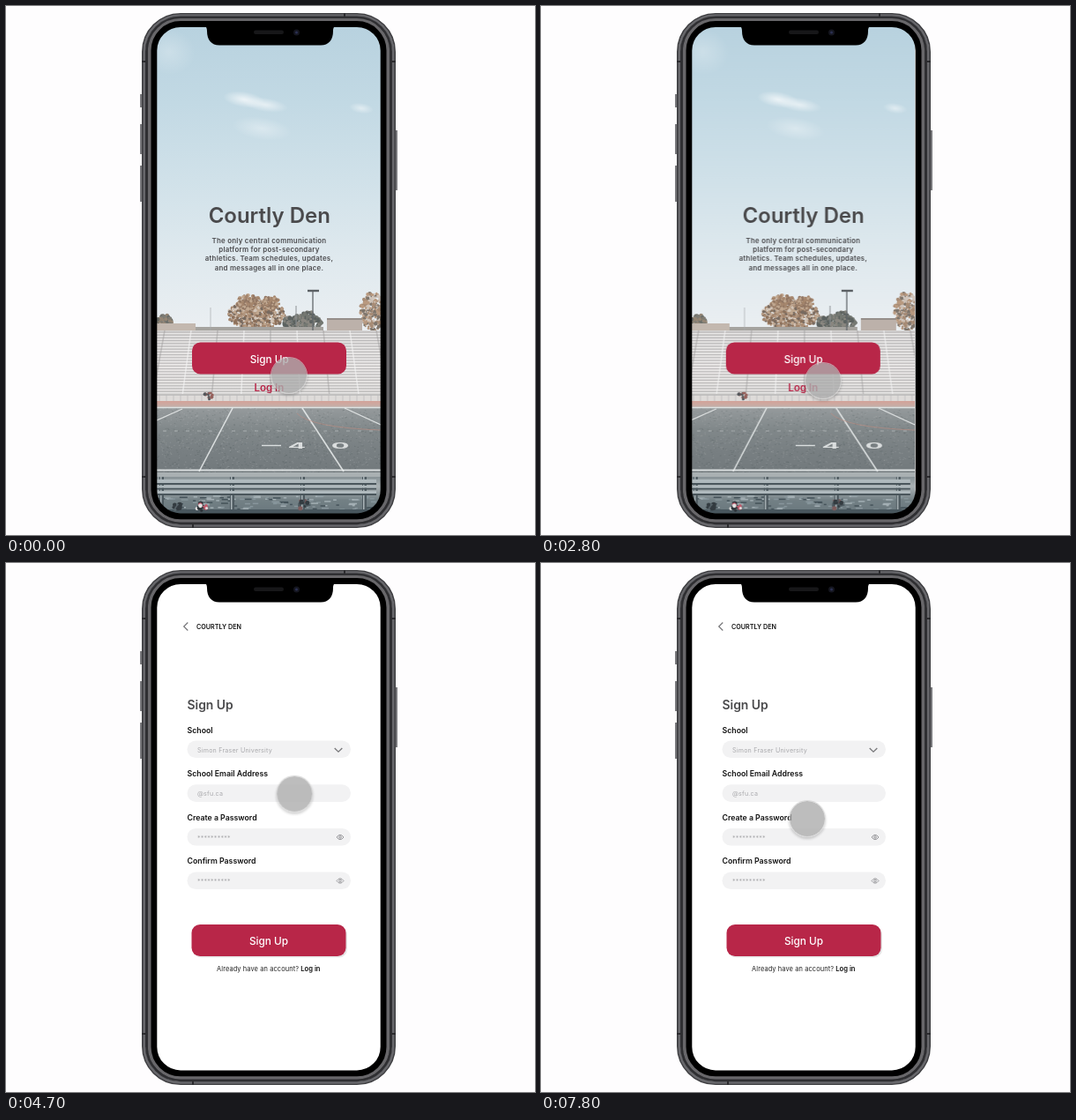
An HTML page with a canvas that plays this animation: 600x600 px, repeating every 8 s.

```html
<!DOCTYPE html>
<html lang="en">
<head>
<meta charset="utf-8">
<title>Sign up flow</title>
<style>
  html, body { margin: 0; width: 100%; height: 100%; overflow: hidden; background: #fefdfe; }
  svg, canvas { position: absolute; left: 0; top: 0; display: block; }
  text { font-family: Inter, sans-serif; white-space: pre; }
  #stage { position: absolute; left: 0; top: 0; width: 600px; height: 600px; overflow: hidden; }
  #screen { position: absolute; left: 171px; top: 23px; width: 254px; height: 553px;
    border-radius: 27px; overflow: hidden; background: #fff; }
  .page { position: absolute; inset: 0; }
  #landing { animation: push-out 8s infinite; }
  #signup { animation: push-in 8s infinite; }
  #menu { animation: menu 8s infinite; }
  #cursor { position: absolute; left: -21px; top: -21px; width: 40px; height: 40px;
    border: 1px solid rgba(205,205,205,.7); border-radius: 50%; background: rgba(173,173,173,.8);
    background-clip: padding-box; box-shadow: 0 2px 3px rgba(0,0,0,.18); animation: cursor 8s infinite; }

  .mid { text-anchor: middle; }
  .b { font-weight: 600; }
  .label { font-size: 8.75px; font-weight: 600; fill: #111; }
  .hint { font-size: 7.1px; letter-spacing: .22px; fill: #a9a9ac; }
  .item { font-size: 7.1px; letter-spacing: .2px; fill: #666; }
  .btn { font-size: 11.8px; font-weight: 500; fill: #fff; text-anchor: middle; }

  @keyframes push-out {
    0%, 34.7% { transform: none; animation-timing-function: ease-in-out; }
    41%, 100% { transform: translateX(-254px); }
  }
  @keyframes push-in {
    0%, 34.7% { transform: translateX(254px); animation-timing-function: ease-in-out; }
    41%, 100% { transform: none; }
  }
  @keyframes menu {
    0%, 62.75% { opacity: 0; }
    65.5%, 90% { opacity: 1; }
    92.5%, 100% { opacity: 0; }
  }
  @keyframes cursor {
    0% { transform: translate(321px, 419px); animation-timing-function: ease-in-out; }
    18%, 50.6% { transform: translate(320px, 425px); animation-timing-function: ease-in; }
    55.5% { transform: translate(325px, 335px); animation-timing-function: ease-out; }
    61.25% { transform: translate(328px, 238px); animation-timing-function: ease-in-out; }
    64% { transform: translate(326px, 233px); animation-timing-function: ease-in-out; }
    67.5%, 74% { transform: translate(323px, 245px); animation-timing-function: ease-in; }
    78% { transform: translate(327px, 300px); animation-timing-function: linear; }
    80.5% { transform: translate(311px, 385px); animation-timing-function: ease-out; }
    82% { transform: translate(298px, 409px); animation-timing-function: ease-in; }
    83.3% { transform: translate(291px, 388px); animation-timing-function: linear; }
    85% { transform: translate(298px, 320px); animation-timing-function: ease-out; }
    88.5%, 90.5% { transform: translate(300px, 242px); animation-timing-function: ease-in-out; }
    97%, 100% { transform: translate(302px, 290px); }
  }
</style>
</head>
<body>
<div id="stage">
  <div id="screen">
    <div class="page" id="landing">
      <canvas id="photo" width="254" height="553"></canvas>
      <svg width="254" height="553" viewBox="171 23 254 553">
        <text class="mid b" x="298.8" y="246" font-size="24" fill="#4a4a4c">Courtly Den</text>
        <g class="mid b" font-size="7.9" letter-spacing=".24" fill="#4c4c4f">
          <text x="298.5" y="268.8">The only central communication</text>
          <text x="298.5" y="279">platform for post-secondary</text>
          <text x="298.5" y="289.2">athletics. Team schedules, updates,</text>
          <text x="298.5" y="299.5">and messages all in one place.</text>
        </g>
        <rect x="211" y="381.5" width="175" height="36" rx="9.5" fill="#b82648"/>
        <text class="btn" x="298.8" y="404.6">Sign Up</text>
        <text class="mid b" x="298.3" y="436.8" font-size="11.5" fill="#b82648">Log In</text>
      </svg>
    </div>
    <div class="page" id="signup">
      <svg width="254" height="553" viewBox="171 23 254 553">
        <defs>
          <linearGradient id="edge">
            <stop offset="0" stop-color="#cf2a55"/><stop offset=".8" stop-color="#b82648"/>
            <stop offset="1" stop-color="#4b4f5c"/>
          </linearGradient>
          <g id="eye" fill="none" stroke="#858588" stroke-width=".8">
            <path d="M-4 0Q0-5.4 4 0Q0 5.4-4 0z"/><circle r="1.3"/>
          </g>
        </defs>
        <path d="M171 23h254v553h-254z" fill="#fff"/>
        <path d="M206.3 67.5l-4.6 4.5 4.6 4.5" fill="none" stroke="#77777a" stroke-width="1.2"/>
        <text class="b" x="216" y="74.7" font-size="7.2" fill="#111">COURTLY DEN</text>
        <text class="b" x="205.5" y="165.8" font-size="13.9" fill="#4a4a4c">Sign Up</text>
        <g id="fields" fill="#f2f2f3"></g>
        <g class="label">
          <text x="205.5" y="192.8">School</text>
          <text x="205.5" y="242.3">School Email Address</text>
          <text x="205.5" y="291.9">Create a Password</text>
          <text x="205.5" y="340.9">Confirm Password</text>
        </g>
        <g class="hint">
          <text x="217" y="215">Simon Fraser University</text>
          <text x="217" y="264.3">@sfu.ca</text>
          <text x="217" y="314.5">**********</text>
          <text x="217" y="364">**********</text>
        </g>
        <path d="M372.7 210l4.3 4.2 4.3-4.2" fill="none" stroke="#77777a" stroke-width="1.3"/>
        <use href="#eye" x="379" y="311"/><use href="#eye" x="379" y="360.5"/>
        <rect x="212" y="412" width="175" height="35.5" rx="9.5" fill="#000" opacity=".1"/>
        <rect x="210.5" y="410" width="175" height="36" rx="9.5" fill="#b82648"/>
        <text class="btn" x="298" y="433.3">Sign Up</text>
        <text x="239" y="462.5" font-size="7.4" letter-spacing=".12" fill="#222">Already have an account?</text>
        <text class="b" x="334.3" y="462.5" font-size="7.6" fill="#111">Log in</text>
        <g id="menu">
          <rect x="205" y="202.5" width="187" height="69" rx="9.5" fill="#000" opacity=".05"/>
          <rect x="205.5" y="202" width="185" height="65.5" rx="9.5" fill="#fff" stroke="url(#edge)" stroke-width="1.3"/>
          <g class="item">
            <text x="216.5" y="214.7" fill="#a9a9ac">Select your institution</text>
            <text class="b" x="216.5" y="229.7" fill="#444">Simon Fraser University</text>
            <text x="216.5" y="244.7">University of British Columbia</text>
            <text x="216.5" y="259.7">Langara College</text>
          </g>
          <path d="M384 222.5v14.5" stroke="#dcdcde" stroke-width="1.5"/>
        </g>
      </svg>
    </div>
  </div>

  <svg width="600" height="600" viewBox="0 0 600 600" fill="none">
    <path d="M153 100v15M153 134v34M153 181v41M443 141v68" stroke="#6b6b6f" stroke-width="1.8"/>
    <g id="shell"></g>
    <path d="M154 63h5M437 63h5M154 534h5M437 534h5M384 8v4M212 588v4" stroke="#2b2b2e" stroke-width="2"/>
    <path d="M222 22.5H377c-5 0-6 2-6 6 0 10-5 16-14 16H242c-9 0-14-6-14-16 0-4-1-6-6-6z" fill="#000"/>
    <rect x="281" y="27.5" width="34" height="4.5" rx="2.2" fill="#171719"/>
    <circle cx="329.5" cy="30" r="3.5" fill="#15161f"/>
    <circle cx="329.5" cy="30" r="1.5" fill="#2b3052"/>
  </svg>
  <div id="cursor"></div>
</div>

<script>
  const addRect = (id, attrs) => {
    const r = document.createElementNS('http://www.w3.org/2000/svg', 'rect');
    for (const k in attrs) r.setAttribute(k, attrs[k]);
    document.getElementById(id).append(r);
  };
  for (const y of [201.5, 251.3, 300.9, 350.4])
    addRect('fields', { x: 205.5, y, width: 185.5, height: 19.6, rx: 9.8 });

  // Phone body: nested rings from the outer rim to the bezel, [inset, thickness, colour].
  const rings = [[0, 2, '#3d3d40'], [1.5, 3, '#67676b'], [4, 3.5, '#2f2f32'],
    [7, 4, '#68676a'], [10.5, 6.8, '#000']];
  for (const [inset, w, stroke] of rings) {
    const d = inset + w / 2;
    addRect('shell', { x: 154 + d, y: 8 + d * .9, width: 288 - 2 * d, height: 584 - 1.85 * d,
      rx: 44 - d, stroke, 'stroke-width': w });
  }

  // Stadium backdrop, drawn once in stage coordinates.
  const c = document.getElementById('photo').getContext('2d');
  c.translate(-171, -23);
  let seed = 7;
  const rnd = () => (seed = seed * 16807 % 2147483647) / 2147483647;
  const box = (x, y, w, h, f) => { c.fillStyle = f; c.fillRect(x, y, w, h); };
  const line = (x1, y1, x2, y2, s, w = 1) => {
    c.strokeStyle = s; c.lineWidth = w;
    c.beginPath(); c.moveTo(x1, y1); c.lineTo(x2, y2); c.stroke();
  };
  const fade = (y, h, stops) => {
    const g = c.createLinearGradient(0, y, 0, y + h);
    stops.forEach((s, i) => g.addColorStop(i / (stops.length - 1), s));
    box(171, y, 254, h, g);
  };
  // Scatter dabs of colour inside an ellipse.
  const dabs = (x, y, rx, ry, n, size, colors) => {
    for (let i = 0; i < n; i++) {
      const a = rnd() * 6.283, d = Math.sqrt(rnd());
      c.fillStyle = colors[i % colors.length];
      c.beginPath();
      c.arc(x + Math.cos(a) * d * rx, y + Math.sin(a) * d * ry, size * (.5 + rnd()), 0, 6.283);
      c.fill();
    }
  };
  // Soft elliptical haze.
  const haze = (x, y, rx, ry, alpha) => {
    c.save();
    c.translate(x, y); c.rotate(.15); c.scale(rx, ry);
    const g = c.createRadialGradient(0, 0, 0, 0, 0, 1);
    g.addColorStop(0, `rgba(255,255,255,${alpha})`);
    g.addColorStop(1, 'rgba(255,255,255,0)');
    c.fillStyle = g; c.fillRect(-1, -1, 2, 2);
    c.restore();
  };

  fade(23, 347, ['#b8d2df', '#c2d9e4', '#d0e1e9', '#dfe9ee', '#ebeff2']);
  haze(270, 106, 24, 9, .7);
  haze(294, 112, 26, 8, .6);
  haze(290, 139, 34, 13, .35);
  haze(403, 116, 14, 6, .5);
  haze(185, 52, 30, 26, .25);

  // Tree line, roofs and light mast
  const dark = ['#5c6260', '#747872', '#8a8780'];
  dabs(336, 359, 23, 8, 200, 1.8, dark);
  dabs(343, 354, 8, 8, 80, 1.6, dark);
  dabs(179, 358, 9, 8, 90, 1.6, ['#6b6e69', '#948574', '#7d7c75']);
  dabs(284, 350, 32, 18, 700, 1.4, ['#a5866d', '#8d715b', '#c0a78f', '#776a60', '#b29780', '#d3c5b8']);
  dabs(275, 336, 14, 8, 130, 1.4, ['#a5866d', '#c0a78f', '#927764']);
  dabs(300, 337, 10, 8, 90, 1.4, ['#a5866d', '#c0a78f', '#927764']);
  dabs(416, 346, 14, 22, 280, 1.5, ['#a78c76', '#7e756c', '#b99a80', '#d0c4ba']);
  box(171, 360, 44, 8, '#c3b8af');
  box(215, 364, 145, 4, '#a5a39f');
  box(364, 355, 40, 13, '#bcb1aa');
  box(364, 354, 40, 2, '#958e8a');
  line(348, 323, 348, 372, '#62676b', 1.3);
  line(342, 323, 355, 323, '#5b6064', 2.4);
  line(329, 340, 329, 362, '#8b9094', 1);
  line(232, 342, 232, 368, '#a9aeb1', .7);

  // Bleachers
  fade(368, 80, ['#d6d4d3', '#e0dddc', '#d6d4d2']);
  for (let y = 370; y < 447; y += 3.2) {
    line(171, y, 425, y, 'rgba(130,130,132,.38)', 1);
    line(171, y + 1.5, 425, y + 1.5, 'rgba(255,255,255,.45)', 1);
  }
  for (let i = 0; i < 9; i++) {
    const x = 180 + i * 30;
    line(x, 368, 299 + (x - 299) * 1.12, 447, i % 2 ? 'rgba(245,245,245,.6)' : 'rgba(150,147,147,.4)', 1.6);
  }
  box(171, 440, 254, 8, '#dedbd9');
  line(171, 441, 425, 441, '#a5a6a7', 1);
  for (let x = 174; x < 425; x += 8) line(x, 441, x, 448, '#bbb9b9', .7);
  dabs(230, 442, 5, 4, 12, 1.5, ['#55585c', '#96605b']);

  // Track and field
  fade(448, 8, ['#d3a299', '#ccaaa2', '#b9b0ad']);
  fade(455, 75, ['#969b9d', '#81888a', '#787f82', '#72797c']);
  for (let i = 0; i < 1300; i++)
    box(171 + rnd() * 254, 456 + rnd() * 73, 1.5, 1, rnd() < .5 ? 'rgba(40,50,54,.14)' : 'rgba(230,235,235,.14)');
  const chalk = 'rgba(236,239,239,.85)';
  line(171, 455.5, 425, 455.5, chalk, 1.4);
  line(257, 456, 219, 528, chalk, 1.6);
  line(336, 456, 383, 528, chalk, 1.6);
  line(200, 457, 171, 470, chalk, 1.2);
  line(384, 456, 425, 475, chalk, 1.2);
  line(171, 526.5, 425, 526.5, chalk, 2);
  c.strokeStyle = 'rgba(192,140,128,.6)'; c.lineWidth = 1;
  c.beginPath(); c.moveTo(330, 462); c.quadraticCurveTo(345, 478, 425, 481); c.stroke();
  for (let x = 178; x < 425; x += 13) line(x, 482, x + 4, 482, 'rgba(230,235,235,.5)', .8);
  line(290, 498.5, 312, 498.5, chalk, 1.4);
  // Painted yard number, flattened by perspective
  c.save();
  c.translate(316, 502); c.scale(3.4, 1);
  c.font = '700 9px Inter, sans-serif';
  c.fillStyle = chalk;
  c.fillText('4', 1, 0); c.fillText('0', 15.5, 0);
  c.restore();

  // Front railing
  fade(529, 47, ['#7f898d', '#87929650', '#78858a', '#66747a']);
  box(171, 529, 254, 47, 'rgba(110,122,127,.45)');
  box(171, 529, 254, 5, '#a9b0b2');
  for (let i = 0; i < 150; i++)
    box(171 + rnd() * 254, 555 + rnd() * 20, 2 + rnd() * 7, 1.5, ['#a3afb4', '#45535a', '#87959b'][i % 3]);
  for (const x of [174, 254, 334, 404]) {
    box(x, 534, 5, 38, '#4e5a60');
    box(x + 1, 534, 1.5, 38, '#abb5b9');
  }
  [[537, 4], [544, 2.5], [550, 3]].forEach(([y, h]) => {
    box(171, y + h, 249, 2, '#4a565c');
    box(171, y, 249, h, '#afb9bd');
  });
  box(171, 571, 254, 5, '#48565d');
  dabs(222, 568, 6, 5, 14, 2, ['#2d3338', '#c25a6c', '#e4e2e2']);
  dabs(193, 568, 5, 4, 9, 2, ['#333b40', '#59656b']);
  dabs(337, 565, 6, 6, 12, 2, ['#333b40', '#7e5c5c', '#4a555b']);
</script>
</body>
</html>
```
